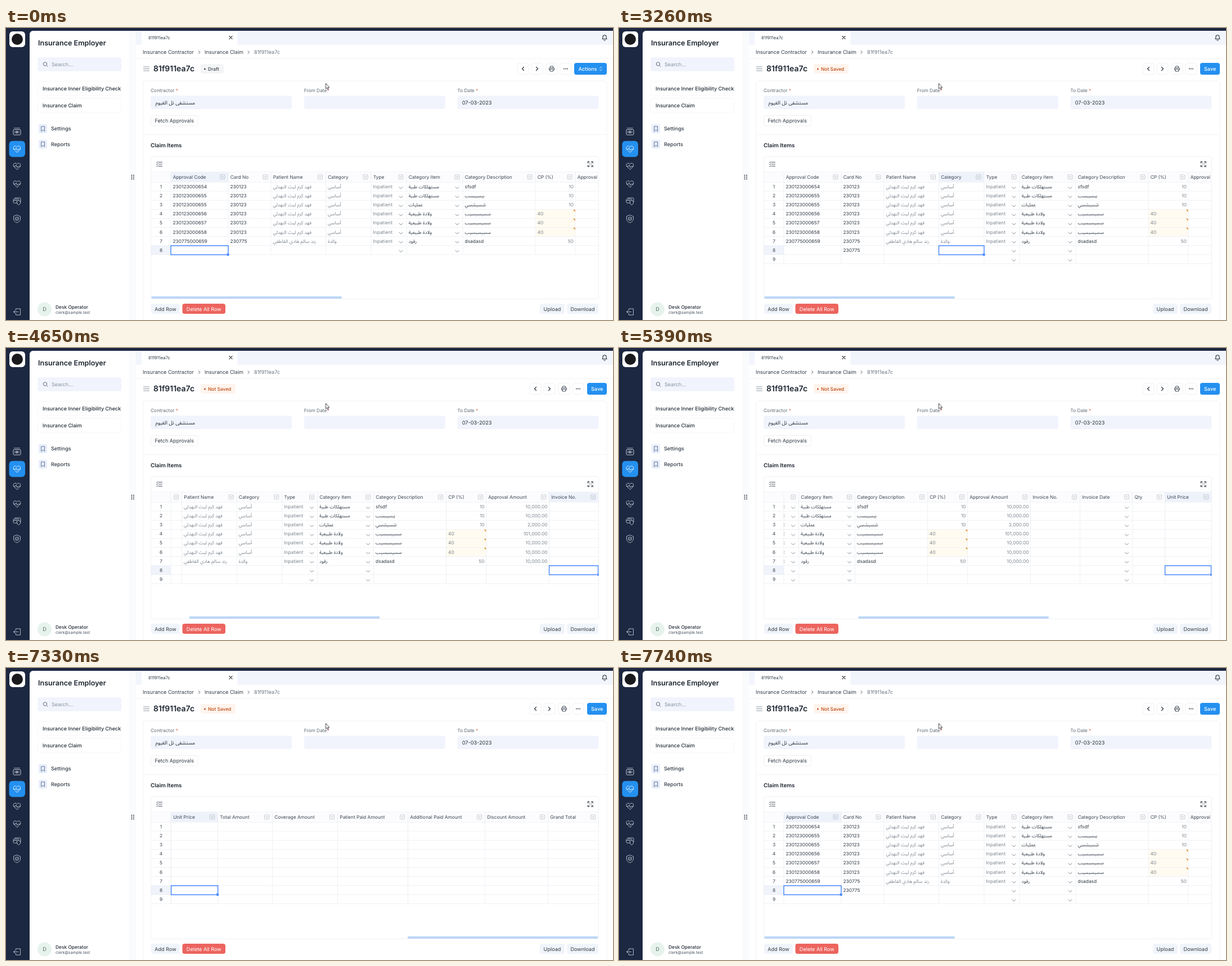
Recreate the animation shown at these times as an HTML page. Size 1079 by 519 pixels, loop 8000 ms.

```html
<!DOCTYPE html>
<html lang="en">
<head>
<meta charset="utf-8">
<title>Insurance Claim</title>
<style>
  html, body { margin: 0; width: 100%; height: 100%; overflow: hidden; background: #fff; }
  svg { display: block; width: 100%; height: 100%; }
  text { font-family: Inter, "Noto Sans Arabic", "DejaVu Sans", sans-serif; text-rendering: geometricPrecision; white-space: pre; }
  .dirty .clean, svg:not(.dirty) .late { display: none; }
  .dirty .tools { transform: translateX(22px); }
</style>
</head>
<body>
<svg id="stage" viewBox="0 0 1079 519"></svg>
<script>
const LOOP = 8000;
const INK = '#303a46', GREY = '#7d858f', PALE = '#f1f4fc', LINE = '#eaedf2', NAVY = '#1c2841', BLUE = '#2490ef';
const LEFT = 293, RIGHT = 1053, HEAD = 256, TOP = 274, ROW = 16.1, ACTIVE = 7;
const VIEW_LEFT = 293.6, VIEW_RIGHT = 1053.6;

const COLUMNS = [
  ['Approval Code', 102], ['Card No', 76], ['Patient Name', 97.5], ['Category', 80.5], ['Type', 63],
  ['Category Item', 100], ['Category Description', 129], ['CP (%)', 71], ['Approval Amount', 112],
  ['Invoice No.', 88], ['Invoice Date', 93], ['Qty', 58], ['Unit Price', 83], ['Total Amount', 97],
  ['Coverage Amount', 116], ['Patient Paid Amount', 125], ['Additional Paid Amount', 137],
  ['Discount Amount', 112], ['Grand Total', 90]
];
const edges = COLUMNS.reduce((xs, [, w]) => [...xs, xs.at(-1) + w], [LEFT]);
const MAX_SCROLL = edges.at(-1) - VIEW_RIGHT;
const DROPDOWNS = [4, 5, 10], NUMERIC = [7, 8], MUTED = [2, 3, 4, 7, 8];

const six = value => Array(6).fill(value);
const supplies = 'مستهلكات طبية', birth = 'ولادة طبيعية', note = 'سسيسبسيب';
const VALUES = [
  ['230123000654', '230123000655', '230123000655', '230123000656', '230123000657', '230123000658', '230775000659'],
  [...six('230123'), '230775'],
  [...six('فهد كرم ليث النهدلي'), 'رند سالم هادي القاطفي'],
  [...six('أساسي'), 'والدة'],
  [...six('Inpatient'), 'Inpatient'],
  [supplies, supplies, 'عمليات', birth, birth, birth, 'رقود'],
  ['sfsdf', 'يبسيبسب', 'شسيشسي', note, note, note, 'dsadasd'],
  ['10', '10', '10', '40', '40', '40', '50'],
  ['10,000.00', '10,000.00', '2,000.00', '101,000.00', '10,000.00', '10,000.00', '10,000.00']
];

// [time in ms, value from then on]
const SELECTED = [
  [0, 0], [530, 1], [2270, 2], [3260, 3], [3530, 4], [3790, 5], [4060, 6], [4260, 7], [4470, 8], [4650, 9],
  [4920, 10], [5190, 11], [5390, 12], [5920, 14], [5990, 16], [6060, 18], [6670, 17], [7130, 16], [7200, 14],
  [7270, 12], [7340, 10], [7410, 9], [7480, 7], [7550, 5], [7600, 4], [7670, 2], [7740, 0]
];
const TYPED = [[0, ''], [1260, '2'], [1320, '230'], [1390, '2307'], [1450, '23077'], [1670, '230775']];
const SAVE_TIME = 2270, TURN_TIME = 6670;
const valueAt = (track, t) => track.findLast(([start]) => t >= start)[1];

const text = (x, cy, str, size = 9.1, fill = INK, weight = 400, extra = '') =>
  `<text x="${x}" y="${cy + size * .36}" font-size="${size}" fill="${fill}" font-weight="${weight}" ${extra}>${str}</text>`;
const rect = (x, y, w, h, fill, r = 0, stroke = 'none', extra = '') =>
  `<rect x="${x}" y="${y}" width="${w}" height="${h}" rx="${r}" fill="${fill}" stroke="${stroke}" ${extra}/>`;
const path = (d, stroke, width = .9, fill = 'none') =>
  `<path d="${d}" stroke="${stroke}" stroke-width="${width}" fill="${fill}" stroke-linecap="round" stroke-linejoin="round"/>`;
const dot = (x, y, r, fill) => `<circle cx="${x}" cy="${y}" r="${r}" fill="${fill}"/>`;
const at = (x, y, body) => `<g transform="translate(${x} ${y})">${body}</g>`;
const hline = (x1, x2, y, color = LINE) => rect(x1, y - .4, x2 - x1, .8, color);
const vline = (x, y1, y2, color = LINE) => rect(x - .4, y1, .8, y2 - y1, color);
const rowTop = r => TOP + r * ROW;
const rowMid = r => rowTop(r) + 8.05;

function rail() {
  const c = '#c3cad6';
  const shield = 'M0-6.5L6-4V0C6 4 3 6 0 7C-3 6-6 4-6 0V-4Z';
  const heart = color => path('M0 6L-5.5 .5C-8.5-4-3-7.5 0-3.5C3-7.5 8.5-4 5.5 .5Z', color)
    + path('M-6 .5H-3L-1.5-2L.5 2.5L2 .5H6', color);
  return rect(0, 0, 1079, 5, NAVY) + rect(0, 0, 50, 519, NAVY)
    + rect(6, 6, 28, 28, '#fff', 6) + dot(20, 20, 10, '#17191d')
    + rect(5.5, 200.7, 28.5, 28.5, BLUE, 6)
    + at(19.5, 184, rect(-6.5, -3.5, 13, 9.5, 'none', 1.5, c) + path('M-5-6H5M-4 1Q0-3 4 1Q0 5-4 1Z', c) + dot(0, 1, 1.3, c))
    + at(19.5, 215, heart('#e8f3ff')) + at(19.5, 245.5, heart(c)) + at(19.5, 277, heart(c))
    + at(19.5, 308, path('M0 3H-5Q-6.5 3-6.5 1.5V-2.5Q-6.5-4-5-4H2Q3.5-4 3.5-2.5M-4-6H5Q6.5-6 6.5-4.5V1M-6-1.5H0', c)
      + path('M3-1.5L6 0V2.5Q6 5 3 6.5Q0 5 0 2.5V0Z', c))
    + at(19.5, 339, path(shield, c) + `<circle r="3" fill="none" stroke="${c}"/>` + path('M-1.3 0L-.3 1L1.5-1', c))
    + at(19.5, 504.5, path('M-2-3V-5.5H6V5.5H-2V3M2 0H-6M-3.5-2.5L-6 0L-3.5 2.5', c));
}

function sidebar() {
  const link = (y, label) => rect(58, y - 8, 15, 16, '#e7eefb', 3)
    + path(`M63 ${y - 4}H68.5V${y + 4.5}L65.8 ${y + 2.2}L63 ${y + 4.5}Z`, '#586a8a') + text(80, y, label, 9.1, INK, 500);
  const card = (y, label) => rect(56.5, y - 13, 148, 26, '#fff', 4, '#f6f7f9') + text(65, y, label, 9.1, '#222c38', 500);
  return rect(42, 5, 200, 520, '#fff', 6) + rect(219, 5, 12, 514, '#fafbfd')
    + text(57, 26.7, 'Insurance Employer', 12.6, '#1c2530', 600)
    + rect(56, 52, 149, 25, PALE, 4) + `<circle cx="69.5" cy="64" r="3.2" fill="none" stroke="#5b6673"/>`
    + path('M72 66.5L74 68.5', '#5b6673') + text(81, 64.5, 'Search...', 9.1, '#88919c')
    + card(107.5, 'Insurance Inner Eligibility Check') + card(138, 'Insurance Claim')
    + link(179, 'Settings') + link(206.5, 'Reports')
    + dot(68.5, 500, 12.5, '#e6f3ec') + text(68.5, 500, 'D', 9.1, '#4b6b5b', 400, 'text-anchor="middle"')
    + text(88, 495.5, 'Desk Operator', 8.4, '#222c38', 500) + text(88, 505.5, 'clerk@sample.test', 7, '#47525f')
    + [261.7, 265, 268.3].map(y => dot(223.4, y, 1, '#30343a') + dot(226.9, y, 1, '#30343a')).join('');
}

function toolbar() {
  const button = (x, icon) => rect(x, 62.5, 20, 20, '#fff', 4, '#f0f1f4') + at(x + 10, 72.5, icon);
  const pill = (cls, w, fill, color, label) => `<g class="${cls}">` + rect(346, 64, w, 17, fill, 4)
    + dot(353.5, 73, 1.4, color) + text(359, 72.8, label, 8.4, color, 500) + '</g>';
  const printer = path('M-2.5-1.5V-4.5H2.5V-1.5M-2.5 2H-4.5V-1.5H4.5V2H2.5M-2.5 .7H2.5V4.5H-2.5Z', '#38424e');
  return path('M244.5 69H254.5M244.5 72.5H254.5M244.5 76H254.5', '#8d96a1', 1)
    + text(262, 72.2, '81f911ea7c', 14, '#1c2530', 600)
    + pill('clean', 41, '#f4f5f6', '#3b4550', 'Draft') + pill('late', 62, '#fff4ed', '#bd4b16', 'Not Saved')
    + '<g class="tools">'
    + button(909, path('M1.5-3L-1.5 0L1.5 3', '#26303a', 1.2)) + button(934, path('M-1.5-3L1.5 0L-1.5 3', '#26303a', 1.2))
    + button(960, printer) + button(985, [-3, 0, 3].map(x => dot(x, 0, .9, '#26303a')).join('')) + '</g>'
    + '<g class="clean">' + rect(1010, 62, 58, 21, BLUE, 4) + text(1017.5, 72.5, 'Actions', 9.1, '#fff', 500)
    + path('M1055.5 71L1057.3 69.2L1059 71M1055.5 74L1057.3 75.8L1059 74', '#fff') + '</g>'
    + '<g class="late">' + rect(1033, 62, 35, 21, BLUE, 4) + text(1040, 72.5, 'Save', 9.1, '#fff', 500) + '</g>';
}

function page() {
  const field = (x, label, value, star = '') => text(x, 111, `${label}<tspan fill="#e06a5e">${star}</tspan>`, 8.4, '#5f6a76')
    + rect(x, 120.5, 251, 23.5, PALE, 4) + text(x + 8.5, 132.5, value, 9.1, '#222c38');
  const button = (x, w, label, fill = '#f0f4fb', color = INK) => rect(x, 490, w, 18, fill, 4)
    + text(x + w / 2, 499.4, label, 9.1, color, 400, 'text-anchor="middle"');
  const crumb = path('M342.5 40.5L345 43L342.5 45.5M430 40.5L432.5 43L430 45.5', '#4b5561');
  return rect(231, 5, 848, 514, '#fff') + rect(231, 5, 848, 25, '#f2f5fc') + rect(241, 5, 170.5, 26, '#fff')
    + text(253, 17, '81f911ea7c', 7.7) + path('M397 14.5L402 19.5M402 14.5L397 19.5', '#333', 1.1)
    + path('M1060 19.5C1061.3 18 1061 17 1061 15.5C1061 11.8 1067 11.8 1067 15.5C1067 17 1066.7 18 1068 19.5ZM1062.7 21.5Q1064 23 1065.3 21.5', '#222c38', 1.1)
    + text(243, 43, 'Insurance Contractor') + text(353, 43, 'Insurance Claim') + text(441, 43, '81f911ea7c', 9.1, '#6b7580')
    + crumb + hline(231, 1079, 54.5, '#f1f2f5')
    + toolbar()
    + rect(243.5, 94, 824.5, 440, '#fff', 5, '#f2f3f6') + hline(244, 1068, 189.5, '#f1f2f5')
    + field(257, 'Contractor', 'مستشفى تل الغيوم', ' *') + field(529.7, 'From Date', '', '*') + field(802.3, 'To Date', '07-03-2023', ' *')
    + rect(257.5, 155.5, 84, 18.5, '#fff', 4, '#eef0f3') + text(264.5, 165, 'Fetch Approvals')
    + text(257, 208, 'Claim Items', 9.8, '#1c2530', 600)
    + rect(257.5, 228.5, 796, 253, '#fff', 4, '#eff1f4')
    + path('M271.5 238.5H277.5M271.5 242H277.5M271.5 245.5H277.5M267.5 238.5L268.5 239.5L270 237.5M267.5 242L268.5 243L270 241M267.5 245.5L268.5 246.5L270 244.5', '#38424e')
    + at(1038.7, 242, path('M-4.5-1.7V-4.5H-1.7M1.7-4.5H4.5V-1.7M4.5 1.7V4.5H1.7M-1.7 4.5H-4.5V1.7M-4.2-4.2L-1.2-1.2M4.2-4.2L1.2-1.2M-4.2 4.2L-1.2 1.2M4.2 4.2L1.2 1.2', '#26303a'))
    + button(258, 51, 'Add Row') + button(313.5, 76.5, 'Delete All Row', '#ec645e', '#fff')
    + button(949, 44, 'Upload') + button(997, 56, 'Download');
}

function cell(c, r) {
  const x = edges[c], right = edges[c + 1], y = rowMid(r), value = VALUES[c]?.[r];
  const flagged = c === 7 && value === '40';
  let out = '';
  if (flagged) out += rect(x + .4, rowTop(r) + .4, right - x - .8, ROW - .8, '#fffbf0')
    + `<path d="M${right - 4} ${rowTop(r) + .6}h4v4z" fill="#e58a1f"/>`;
  if (value) {
    const atEnd = NUMERIC.includes(c) && !flagged;
    out += text(atEnd ? right - 3 : x + 3.5, y, value, 8.4, MUTED.includes(c) ? GREY : INK, 400, atEnd ? 'text-anchor="end"' : '');
  }
  if (DROPDOWNS.includes(c)) out += path(`M${right - 13} ${y + .6}l3 3l3-3`, '#747d88');
  return out;
}

function tableRow(r) {
  return COLUMNS.map((_, c) => cell(c, r) + vline(edges[c + 1], rowTop(r), rowTop(r + 1))).join('')
    + hline(LEFT, edges.at(-1), rowTop(r + 1));
}

function headerCell([label], c) {
  const right = edges[c + 1];
  return text(edges[c] + 3.7, 265, label, 8.4, '#3d4753') + vline(right, HEAD, TOP)
    + rect(right - 14, 261, 8, 7.5, 'none', 1, '#b4bac2', 'stroke-width=".8"')
    + path(`M${right - 11.7} 264.2l1.7 1.4l1.7-1.4`, '#8d949d', .8);
}

function table() {
  const rows = [...Array(9).keys()];
  const late = (r, body) => r === 8 ? `<g class="late">${body}</g>` : body;
  const number = r => (r === ACTIVE ? rect(258, rowTop(r), 35, ROW, '#f0f3fa') : '')
    + text(275.5, rowMid(r), r + 1, 8.4, '#3d4753', 400, 'text-anchor="middle"')
    + hline(258, LEFT, rowTop(r + 1)) + vline(LEFT, rowTop(r), rowTop(r + 1));
  return `<defs><clipPath id="body">${rect(LEFT, HEAD - 1, RIGHT - LEFT, 200)}</clipPath>
    <clipPath id="frame">${rect(LEFT - 1.5, HEAD - 1, RIGHT - LEFT + 2, 200)}</clipPath></defs>`
    + rect(258, HEAD, 795, TOP - HEAD, '#fcfcfe') + hline(258, RIGHT, HEAD) + hline(258, RIGHT, TOP) + vline(LEFT, HEAD, TOP)
    + rows.map(r => late(r, number(r))).join('')
    + `<g clip-path="url(#body)"><g class="scroller">${rect(0, HEAD + .4, 0, TOP - HEAD - .8, '#eef2fb', 0, 'none', 'id="headMark"')}`
    + COLUMNS.map(headerCell).join('') + rows.map(r => late(r, tableRow(r))).join('')
    + text(edges[1] + 3.5, rowMid(ACTIVE), '', 8.4, INK, 400, 'id="typed"') + '</g></g>'
    + `<g clip-path="url(#frame)"><g class="scroller">`
    + rect(0, rowTop(ACTIVE) + .2, 0, ROW, 'none', 0, '#4b89ff', 'id="cursorCell" stroke-width="1.5"')
    + rect(0, rowTop(ACTIVE + 1) - 2.7, 5, 5, '#4b89ff', 0, '#fff', 'id="handle" stroke-width=".6"') + '</g></g>'
    + rect(258, 477, 339, 4, '#bdd7f7', 2, 'none', 'id="thumb"');
}

const stage = document.getElementById('stage');
const pointer = at(568.5, 99, path('M0 0V9L2 7.2L3.5 10.3L4.9 9.6L3.4 6.6H6Z', '#222', .8, '#fff'));
stage.innerHTML = rail() + sidebar() + page() + table() + pointer;
const [headMark, typed, cursorCell, handle, thumb] =
  ['headMark', 'typed', 'cursorCell', 'handle', 'thumb'].map(id => document.getElementById(id));
const scrollers = stage.querySelectorAll('.scroller');

function draw(t) {
  const column = valueAt(SELECTED, t), x = edges[column], right = edges[column + 1];
  const wanted = t < TURN_TIME ? right - VIEW_RIGHT : Math.min(MAX_SCROLL, x - VIEW_LEFT);
  const scroll = Math.max(0, wanted);
  stage.classList.toggle('dirty', t >= SAVE_TIME);
  scrollers.forEach(g => g.setAttribute('transform', `translate(${-scroll} 0)`));
  for (const box of [headMark, cursorCell]) {
    box.setAttribute('x', x);
    box.setAttribute('width', Math.min(right - x, RIGHT - .4 + scroll - x));
  }
  handle.setAttribute('x', right - 3);
  thumb.setAttribute('x', 258 + scroll * .426);
  typed.textContent = valueAt(TYPED, t);
}

const start = performance.now();
function tick() {
  draw((performance.now() - start) % LOOP);
  requestAnimationFrame(tick);
}
tick();
</script>
</body>
</html>
```
